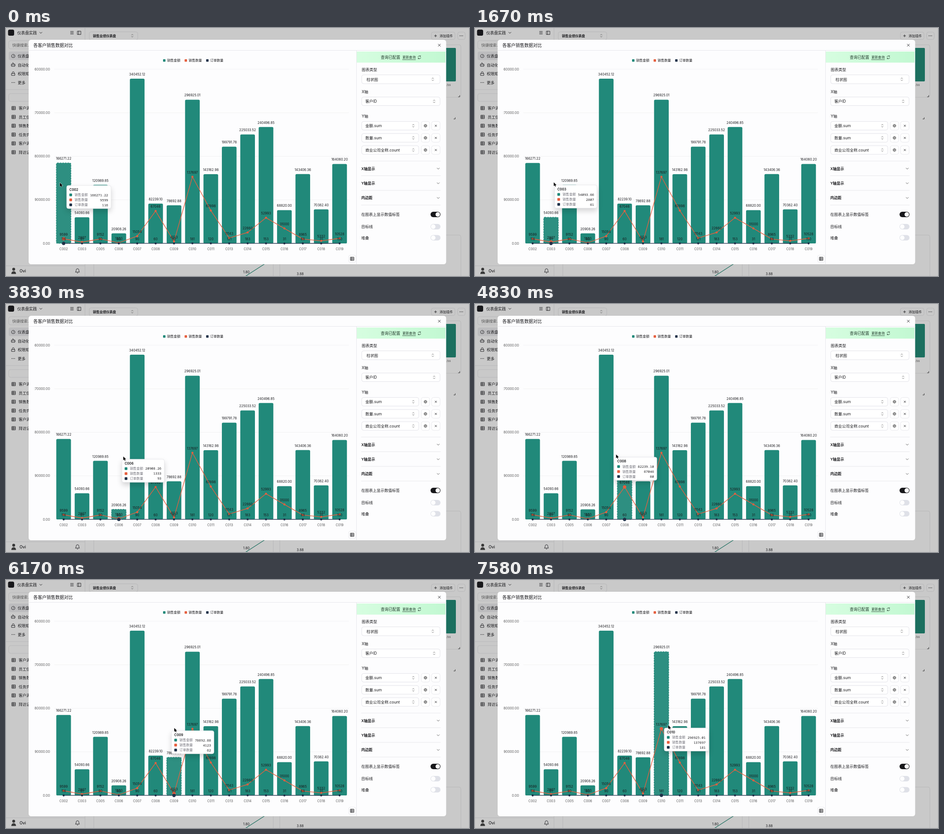
Write an HTML page that moves like this. It is 1023x548 px and loops after 7660 ms.

```html
<!DOCTYPE html>
<html lang="zh-CN">
<head>
<meta charset="utf-8">
<style>
  html, body { margin: 0; width: 100%; height: 100%; overflow: hidden; background: #c9c9c9; }
  svg { display: block; width: 1023px; height: 548px; }
  text { font-family: Inter, "Noto Sans CJK SC", "Noto Sans CJK", sans-serif; white-space: pre; }
  .mono { font-family: "Noto Sans Mono", monospace; }
  .bar { fill: #21897a; }
  .bar.on { fill-opacity: .94; stroke: #21897a; stroke-width: 1.2; stroke-dasharray: 2.8; }
  #tip { filter: drop-shadow(0 6px 6px rgba(0, 0, 0, .16)); }
</style>
</head>
<body>
<svg id="stage" viewBox="0 0 1023 548"></svg>
<script>
const INK = '#18181b', TEAL = '#21897a', RED = '#e65f3f', NAVY = '#20324a';
const stage = document.getElementById('stage');
let layer = stage;

function el(tag, attrs, parent = layer) {
  const node = document.createElementNS('http://www.w3.org/2000/svg', tag);
  for (const k in attrs) node.setAttribute(k, attrs[k]);
  parent.appendChild(node);
  return node;
}
const rect = (x, y, width, height, rx = 0, fill = 'none', stroke = 'none', more) =>
  el('rect', { x, y, width, height, rx, fill, stroke, 'stroke-width': .8, ...more });
const path = (d, stroke = INK, width = .9, fill = 'none', more) =>
  el('path', { d, stroke, fill, 'stroke-width': width, 'stroke-linecap': 'round', 'stroke-linejoin': 'round', ...more });
const dot = (cx, cy, r, fill) => el('circle', { cx, cy, r, fill });
// Text centred vertically on cy
function text(x, cy, str, size = 8.5, fill = INK, more) {
  const node = el('text', { x, y: cy + size * .365, 'font-size': size, fill, ...more });
  node.textContent = str;
  return node;
}
const middle = { 'text-anchor': 'middle' }, end = { 'text-anchor': 'end' };
const bold = { 'font-weight': 600 }, medium = { 'font-weight': 500 };

// Icons
const down = (x, y, c = INK) => path(`M${x - 2.6} ${y - 1.3}l2.6 2.6 2.6-2.6`, c);
const upDown = (x, y) => path(`M${x - 1.8} ${y - 1.4}l1.8-1.8 1.8 1.8M${x - 1.8} ${y + 1.4}l1.8 1.8 1.8-1.8`, '#555', .8);
const cross = (x, y, r) => path(`M${x - r} ${y - r}l${2 * r} ${2 * r}m0 ${-2 * r}l${-2 * r} ${2 * r}`);
const table = (x, y) => path(`M${x - 3.7} ${y - 3.7}h7.4v7.4h-7.4zM${x - 3.7} ${y - 1.2}h7.4M${x - 3.7} ${y + 1.3}h7.4M${x - 1} ${y - 3.7}v7.4`);
const dots = (x, y) => [-3, 0, 3].forEach(d => dot(x + d, y, .8, INK));
const corner = (x, y) => path(`M${x} ${y - 3}v3h-3`, '#333', 1);
function gear(x, y) {
  dot(x, y, 2.6, 'none').setAttribute('stroke', '#333');
  el('circle', { cx: x, cy: y, r: 3.2, fill: 'none', stroke: '#333', 'stroke-width': .9, 'stroke-dasharray': '1.25' });
  dot(x, y, 1, '#333');
}

function drawBackdrop() {
  const edge = '#b3b3b5';
  path('M174.5 0V548M0 136H174M0 525.5H174', edge, .8);
  rect(4.5, 3.5, 13.5, 13.5, 3.5, INK);
  text(25, 10.5, '仪表盘实践', 8.6, INK, medium);
  down(77, 10.5);
  path('M142.5 7.6h6.5m-6.5 2.8h6.5m-6.5 2.8h6.5');
  path('M158 7h7.4v7.4h-7.4zM160.6 7v7.4');
  rect(6, 28, 162, 18, 4, 'none', edge);
  text(14, 37.5, '快捷搜索...', 8.5, '#555');
  rect(6, 52, 162, 19, 4, '#bcbcbe');
  ['仪表盘', '自动化', '权限矩阵', '更多'].forEach((s, i) => text(26, 62 + i * 19.5, s, 8.5, INK, medium));
  path('M13.4 65a3.9 3.9 0 1 1 5.2 0zM16 62.5l1.4-2');
  path('M12.5 79.5h7v5.2h-7zM16 79.5v-2.5h-1.5M11.3 82h1M19.7 82h1M14.6 81.5v1M17.4 81.5v1');
  path('M12.5 100.5h7v4.3h-7zM13.9 100.5v-1.8a2.1 2.1 0 0 1 4.2 0v1.8');
  dots(16, 120.5);
  rect(6, 145, 162, 17, 4, 'none', edge);
  ['客户满意', '员工信息', '销售数据', '任务完成', '客户满意', '拜访记录'].forEach((s, i) => {
    table(17, 177 + i * 19.5);
    text(28, 177 + i * 19.5, s);
  });
  dot(17, 533, 3.2, '#3a3a3a');
  path('M11.8 543.5c0-8 10.4-8 10.4 0z', 'none', 0, '#3a3a3a');
  text(30, 536.5, 'Ovi', 8.8, INK, medium);
  path('M153.7 539.3h8.6c-1.6-1.6-1-3.6-1.4-5.2a3 3 0 0 0-5.8 0c-.4 1.6.2 3.6-1.4 5.2zM157 541.4q1 .8 2 0');

  rect(184, 8.5, 107, 18, 4, 'none', edge);
  text(192, 17.5, '销售业绩仪表盘', 7.3, INK, bold);
  upDown(279, 17);
  rect(940, 9, 52, 16.5, 4, 'none', edge);
  path('M946.6 17.3h5m-2.5-2.5v5');
  text(958, 17.3, '添加插件', 7.3, INK, medium);
  rect(998, 9, 16.5, 16.5, 4, 'none', edge);
  dots(1006, 17.3);
  rect(194, 37, 811, 116, 4, 'none', edge);
  rect(960, 44, 34, 74, 2, '#1c6f5f');
  text(973.5, 126, '/ss', 6.5, '#444');
  corner(1002.5, 152);
  corner(992.5, 201);
  rect(194, 457.5, 396.5, 110, 4, 'none', edge);
  rect(605, 457.5, 400, 110, 4, 'none', edge);
  path('M530 548L572 521', '#1c6f5f', 1.2);
  text(531, 539.5, '1.80', 7.3, INK, middle);
  text(650, 543, '3.88', 7.3, INK, middle);
}

function select(x, y, w, h, label, labelX, arrowX) {
  rect(x, y, w, h, 4, '#fff', '#dcdce4');
  text(labelX, y + h / 2 + .2, label);
  upDown(arrowX, y + h / 2);
}
function toggle(y, on) {
  rect(938, y - 6, 22, 12, 6, on ? INK : '#dfe1e8');
  dot(on ? 954 : 944, y, 4.9, '#fff');
}

function drawPanel() {
  const line = '#e2e2e8';
  rect(50, 26, 922.5, 496, 5.5, '#fdfdfe');
  text(60.5, 38, '各客户销售数据对比', 9.7, INK, medium);
  cross(957.5, 38, 2.5);
  path('M50 49.5H972.5M774.5 49.5V522', line, .8);
  const grad = el('linearGradient', { id: 'mint' });
  el('stop', { offset: 0, 'stop-color': '#d6fde0' }, grad);
  el('stop', { offset: 1, 'stop-color': '#c2f8d2' }, grad);
  rect(775, 52, 196, 24.5, 0, 'url(#mint)');
  text(828, 64.5, '查询已配置', 8.6, '#1d3427');
  text(876, 64.5, '更新查询', 7.3, '#1d3427', medium);
  path('M876 70H905', '#1d3427', .8);
  path('M910.4 64a3 3 0 0 1 5.5-1.2v-1.8m0 1.8h-1.8M916.4 65.5a3 3 0 0 1-5.5 1.2v1.8m0-1.8h1.8', '#1d3427', .8);

  text(786, 92, '图表类型');
  select(786, 103.5, 173, 19.5, '柱状图', 796.5, 943);
  text(786, 141, 'X轴');
  select(786, 152.5, 173, 19, '客户ID', 794, 946);
  text(786, 195, 'Y轴');
  ['金额.sum', '数量.sum', '商业公司全称.count'].forEach((s, i) => {
    const y = 206.5 + i * 26.8;
    select(786, y, 126, 19, s, 794, 900);
    rect(917.5, y, 18.5, 19, 4, '#fff', line);
    gear(926.8, y + 9.5);
    rect(940.5, y, 18.5, 19, 4, '#fff', line);
    cross(949.7, y + 9.5, 1.8);
  });
  for (let i = 0; i < 4; i++) path(`M785 ${294 + i * 32.4}H960`, line, .8);
  ['X轴显示', 'Y轴显示', '内边距'].forEach((s, i) => {
    text(785, 310.7 + i * 32.4, s, 8.2, INK, bold);
    down(955, 310.7 + i * 32.4, '#555');
  });
  text(785, 412, '在图表上显示数值标签');
  text(785, 439, '目标线');
  text(785, 463.5, '堆叠');
  toggle(412, true);
  toggle(439, false);
  toggle(463.5, false);
  rect(757, 502, 16, 16, 4, '#fff', line);
  table(765, 510);
}

// Chart data: id, amount, quantity, orders
const rows = `002 166271.22 9599 116|003 54093.66 2807 61|005 120989.85 9152 90|006 20908.26 1333 93
007 340452.12 15054 90|008 82239.10 67046 60|009 78692.88 4123 62|010 296925.01 137697 181
011 143162.98 67898 120|013 199791.78 11143 121|014 225033.52 22660 183|015 240496.85 52993 153
016 68820.00 31000 31|017 143406.36 8965 88|018 70382.40 5332 31|019 164060.20 10528 150`
  .split(/[|\n]/).map(r => r.trim().split(' '));
const names = ['销售金额', '销售数量', '订单数量'], colors = [TEAL, RED, NAVY];
const BASE = 476, STEP = 40.65, LEFT = 107;
const px = i => LEFT + STEP * (i + .5);
const py = v => BASE - v * 385 / 360000;
const bars = [], activeDots = [];

function drawChart() {
  const clip = el('clipPath', { id: 'plot' });
  el('rect', { x: 62.8, y: 50, width: 710, height: 470 }, clip);
  layer = el('g', { 'clip-path': 'url(#plot)' });
  for (let v = 0; v <= 360000; v += 90000) {
    path(`M${LEFT} ${py(v)}H757.4`, '#ededf0', .7);
    text(97, py(v), v.toFixed(2), 7.25, '#555', end);
  }
  layer = stage;
  names.forEach((s, i) => {
    rect(347 + i * 47.6, 69, 5.4, 5.4, 1, colors[i]);
    text(356 + i * 47.6, 71.8, s, 7.3, INK, medium);
  });
  rows.forEach((r, i) => {
    const y = py(r[1]);
    bars.push(rect(px(i) - 16.2, y, 32.4, BASE - y, 2.6, TEAL, 'none', { class: 'bar' }));
    bars[i].removeAttribute('stroke-width');
    text(px(i), BASE + 12.8, 'C' + r[0], 7.2, '#555', middle);
  });
  const labels = k => rows.forEach((r, i) => text(px(i), py(r[k]) - 9.7, r[k], 7.2, INK, middle));
  labels(1);
  for (const k of [2, 3]) {
    const c = colors[k - 1];
    path('M' + rows.map((r, i) => `${px(i)} ${py(r[k])}`).join('L'), c, 1.35);
    rows.forEach((r, i) => dot(px(i), py(r[k]), 2.3, c));
    activeDots.push(dot(0, 0, 3.7, c));
  }
  labels(2);
  labels(3);
}

const tip = {};
function drawTip() {
  tip.group = layer = el('g', { id: 'tip' });
  tip.box = rect(0, 0, 98, 51, 4, '#fff', '#e4e4e9');
  tip.title = text(6, 9, '', 7.3, INK, bold);
  tip.values = names.map((s, i) => {
    const y = 20.8 + i * 11;
    rect(6, y - 3, 6, 6, 1.2, colors[i]);
    text(17.5, y, s, 7.35, '#71717a');
    return text(0, y, '', 7.4, INK, { class: 'mono', ...end, ...medium });
  });
  layer = stage;
  tip.cursor = path('M0 0V8.2L2 6.5 3.4 9.4 4.9 8.7 3.5 5.9H6.1Z', '#fff', .8, '#000', { 'paint-order': 'stroke' });
}

drawBackdrop();
drawPanel();
drawChart();
drawTip();

// time, pointer x, pointer y, tooltip x
const keys = [
  [0, 119, 342, 134], [830, 155, 342, 157], [920, 162, 342, 168], [1670, 174, 341, 176],
  [2420, 219, 339, 215], [2920, 219, 339, 215], [3670, 259, 337, 256], [3830, 259, 337, 256],
  [4500, 296, 334, 293], [5330, 335, 330, 331], [5670, 342, 329, 337], [6170, 372, 327, 366],
  [6750, 398, 324, 389], [7000, 422, 322.5, 414], [7580, 427, 321, 418], [7660, 427, 321, 418]
];
const LOOP = 7660, TICK = 1000 / 12;

function pose(t) {
  const n = Math.max(1, keys.findIndex(k => k[0] >= t));
  const a = keys[n - 1], b = keys[n], f = (t - a[0]) / (b[0] - a[0]);
  return a.map((v, i) => v + (b[i] - v) * f);
}

function draw() {
  const now = performance.now() % LOOP;
  const [, x, y, tipX] = pose(Math.floor((now + 4) / TICK) * TICK);
  const active = Math.floor((x - LEFT) / STEP), row = rows[active];
  bars.forEach((b, i) => b.classList.toggle('on', i === active));
  activeDots.forEach((d, i) => {
    d.setAttribute('cx', px(active));
    d.setAttribute('cy', py(row[i + 2]));
  });
  const width = 58 + 4.45 * row[1].length;
  tip.box.setAttribute('width', width);
  tip.title.textContent = 'C' + row[0];
  tip.values.forEach((v, i) => {
    v.textContent = row[i + 1];
    v.setAttribute('x', width - 6.5);
  });
  tip.group.setAttribute('transform', `translate(${tipX} ${y + 6})`);
  tip.cursor.setAttribute('transform', `translate(${x} ${y})`);
  requestAnimationFrame(draw);
}
draw();
</script>
</body>
</html>
```
